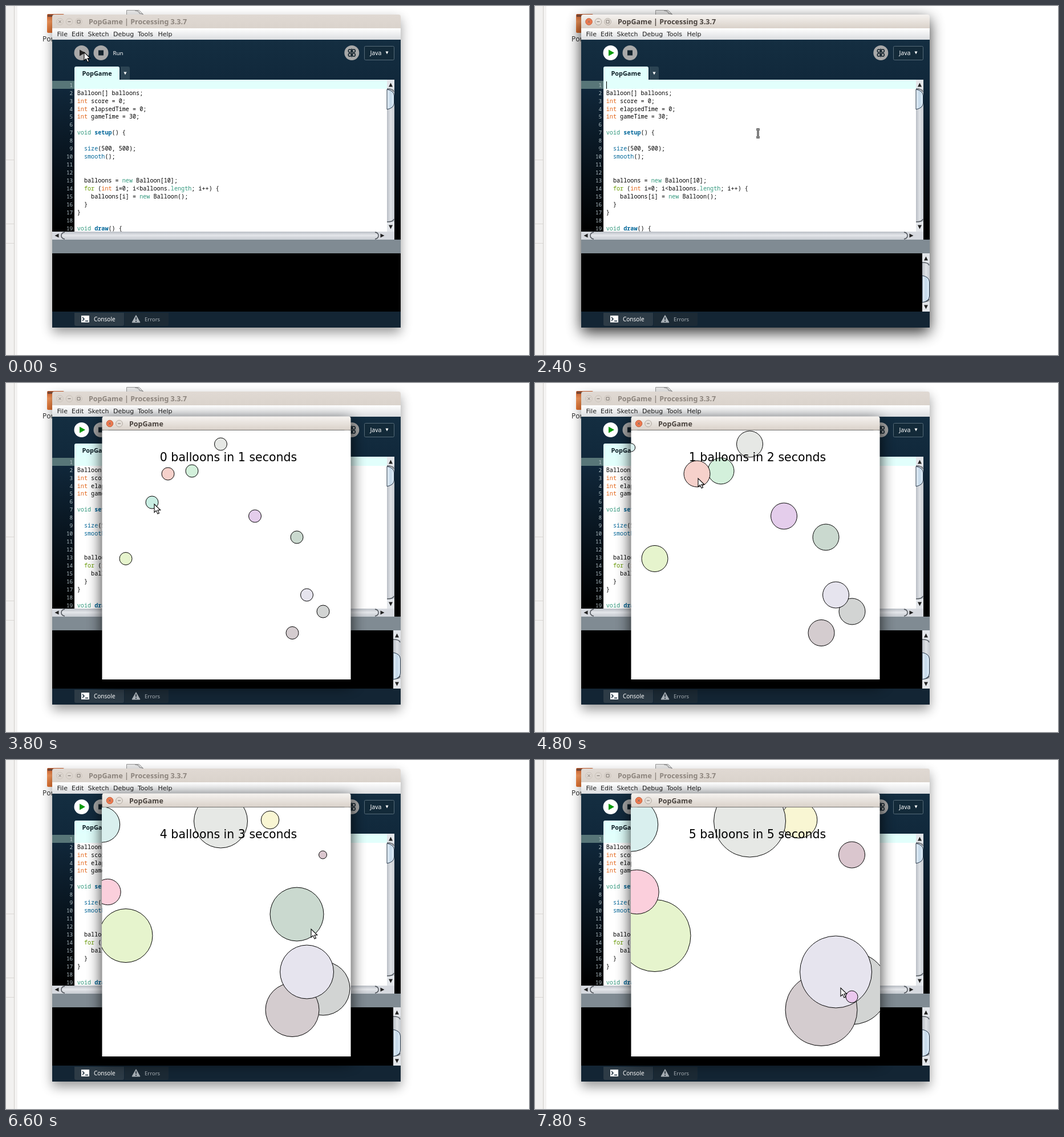
An HTML page for the animation above (8 s loop, 917 px wide and 611 px high).

```html
<!DOCTYPE html>
<html lang="en">
<head>
<meta charset="utf-8">
<title>PopGame</title>
<style>
html, body { margin: 0; width: 100%; height: 100%; overflow: hidden; background: #fff; }
svg { display: block; }
text { font-family: "Noto Sans", "Open Sans", sans-serif; white-space: pre; }
.menu text { font: 11px "DejaVu Sans", sans-serif; fill: #1c1c1c; }
.code text { font: 10.15px "Noto Sans Mono", monospace; fill: #000; }
.code .num { font-size: 9.2px; fill: #b4c3c8; text-anchor: end; }
.int { fill: #e2661a; }
.void, .new, .length { fill: #33997e; }
.for { fill: #669900; }
.size, .smooth { fill: #006699; }
.setup, .draw { fill: #006699; font-weight: bold; }
.title text { font-size: 12.5px; font-weight: bold; fill: #8d857e; }
.title .bar { fill: url(#dim); }
.title circle { fill: none; stroke: #cac2ba; }
.title path { fill: none; stroke: #77706a; }
.title.on text { fill: #4a433e; }
.title.on .bar { fill: url(#lit); }
.title.on circle { fill: #e6e0da; stroke: #b0a8a0; }
.title.on .close { fill: #ee7a50; stroke: #c0623f; }
.shade { filter: blur(10px); opacity: .4; }
.shade.on { filter: blur(13px); opacity: .8; }
#balls circle { stroke: #000; }
#count { font: 20.5px "DejaVu Sans", sans-serif; text-anchor: middle; }
</style>
</head>
<body>
<svg id="stage" width="917" height="611" viewBox="0 0 917 611"></svg>
<script>
const $ = id => document.getElementById(id);
const rect = (x, y, w, h, fill, more = '') =>
  `<rect x="${x}" y="${y}" width="${w}" height="${h}" fill="${fill}" ${more}/>`;
const path = (d, fill, more = '') => `<path d="${d}" fill="${fill}" ${more}/>`;
const disc = (x, y, r, fill, more = '') => `<circle cx="${x}" cy="${y}" r="${r}" fill="${fill}" ${more}/>`;
const text = (x, y, s, more = '') => `<text x="${x}" y="${y}" ${more}>${s}</text>`;
const grad = (id, stops, across) =>
  `<linearGradient id="${id}" x2="${across ? 1 : 0}" y2="${across ? 0 : 1}">` +
  stops.map(([o, c]) => `<stop offset="${o}" stop-color="${c}"/>`).join('') + '</linearGradient>';

// Small triangle pointing along (dx, dy)
const arrow = (x, y, dx, dy, s = 3.5, fill = '#222') =>
  path(`M${x + dx * s} ${y + dy * s}L${x - dx * s + dy * s} ${y - dy * s + dx * s}` +
       `L${x - dx * s - dy * s} ${y - dy * s - dx * s}Z`, fill);

function titleBar(id, x, y, w, buttons, label) {
  const marks = ['m-2-2l4 4m0-4l-4 4', 'm-2.5 0h5', 'm-2.5-2.5h5v5h-5z'];
  const cy = y + 12.5;
  let s = path(`M${x} ${y + 24}v-20q0-4 4-4h${w - 8}q4 0 4 4v20z`, '', 'class="bar" style="stroke:none"');
  buttons.forEach((bx, i) => {
    s += disc(bx, cy, 5.8, '', i ? '' : 'class="close"') + `<path d="M${bx} ${cy}${marks[i]}"/>`;
  });
  return `<g id="${id}" class="title on">${s}${text(buttons.at(-1) + 17.5, y + 17, label)}</g>`;
}

// Vertical scroll bar, thumb from a to b
function scrollBar(x, y, h, a, b) {
  const end = y + h, c = x + 6.5;
  return rect(x, y, 13, h, 'url(#track)') +
    rect(x, y, 13, 16, '#e3e6ea') + rect(x, end - 17, 13, 17, '#e3e6ea') +
    path(`M${x} ${y + 16}q11 0 12 5M${x} ${end - 17}q11 0 12-5`, 'none', 'stroke="#555b62" stroke-width="1.5"') +
    path(`M${x} ${a}q12 2 12.5 11v${b - a - 22}q-.5 9-12.5 11z`, 'url(#thumb)', 'stroke="#27384a"') +
    arrow(c, y + 9, 0, -1) + arrow(c, end - 8, 0, 1);
}

const source = `
Balloon[] balloons;
int score = 0;
int elapsedTime = 0;
int gameTime = 30;

void setup() {

  size(500, 500);
  smooth();


  balloons = new Balloon[10];
  for (int i=0; i&lt;balloons.length; i++) {
    balloons[i] = new Balloon();
  }
}

void draw() {`;
const words = /\b(int|void|new|length|for|size|smooth|setup|draw)\b/g;
const code = source.split('\n').map((line, i) => {
  const y = 141.6 + i * 13.97;
  return text(117, y, i + 1, 'class="num"') +
    text(124.8, y, line.replace(words, '<tspan class="$1">$1</tspan>'), 'xml:space="preserve"');
}).join('');

const desktop =
  rect(0, 0, 14, 611, '#f2f1f0') + rect(14, 0, 1, 611, '#cfccc9') + rect(15, 0, 5, 611, '#f4f3f2') +
  [269, 381, 415].map(y => rect(0, y, 14, 1, '#dad7d4')).join('') +
  rect(72, 14, 30, 33, 'url(#folder)', 'rx="2"') + rect(73, 15, 28, 4, '#7d4a35') +
  text(64, 62, 'Por', 'font-size="12" fill="#333"') +
  path('M211.500 30v-22.500h22l8 8v14.500z', '#e9e9e9', 'stroke="#999"') +
  path('M226 8q8 0 8 5 5 0 7 3', '#ccc', 'stroke="#888"');

const menu = [['File', 89.5], ['Edit', 115], ['Sketch', 143.5], ['Debug', 188], ['Tools', 231], ['Help', 266.5]]
  .map(([s, x]) => text(x, 52.5, s)).join('');

const toolbar =
  disc(132.5, 82, 13, '#a9a9a9', 'id="play"') + path('M129 76.500v11l10-5.500z', '#222', 'id="tri"') +
  disc(166.5, 82, 13, '#a9a9a9') + rect(162, 77.5, 9, 9, '#15242e') +
  text(187.5, 86, 'Run', 'id="run" font-size="9.7" fill="#fff"') +
  disc(606.3, 82, 13, '#a9a9a9') +
  `<g fill="none" stroke="#15242e" stroke-width="1.5">` +
  [[602.8, 78.5], [609.8, 78.5], [602.8, 85.5], [609.8, 85.5]].map(([x, y]) => disc(x, y, 2.6, 'none')).join('') +
  '<path d="M606.300 74.500v15"/></g>' +
  rect(628.5, 70.5, 52, 24, '#132a39', 'rx="2" stroke="#566b78"') +
  text(638.5, 85.5, 'Java', 'font-size="10.5" fill="#fff"') + arrow(668, 82, 0, 1, 2.5, '#fff') +
  path('M120 129v-20q0-3 3-3h73q3 0 3 3v20z', '#e0fffd') +
  text(133.5, 121.5, 'PopGame', 'font-size="10.9" font-weight="600" fill="#0a1a22"') +
  path('M201 129v-23h13q3 0 3 3v20z', '#2c4453') + arrow(209, 118, 0, 1, 2.6, '#fff');

const editor =
  rect(120, 129, 548, 266, '#fff') + rect(120, 129, 548, 16, '#e2fffc') + rect(81, 131, 39, 14, '#587678') +
  `<clipPath id="page"><path d="M81 129h587v266h-587z"/></clipPath><g class="code" clip-path="url(#page)">${code}</g>` +
  rect(125, 132, 1, 13, '#000', 'id="caret"') +
  scrollBar(668, 129, 266, 146, 181) +
  rect(81, 395, 600, 14, '#d6d9df') + rect(97, 395, 557, 13, 'url(#rail)', 'rx="6"') +
  path('M103 396q-6 1-6 6t6 6M647 396q6 1 6 6t-6 6', 'none', 'stroke="#50555b" stroke-width="1.5"') +
  arrow(89, 402, -1, 0) + arrow(660, 402, 1, 0);

const footer =
  rect(81, 409, 611, 24, '#808b93') + rect(81, 433, 611, 102, '#000') +
  `<g id="bar">${scrollBar(679, 433, 102, 472, 519)}</g>` + rect(81, 535, 611, 28, '#132534') +
  path('M120 537h87v20q0 3-3 3h-81q-3 0-3-3z', '#2d3b46') + path('M208 537h77v20q0 3-3 3h-74z', '#1c2a35') +
  rect(132, 542, 14, 12, '#fff') + path('M134 545l3 3-3 3M139 551.500h5', 'none', 'stroke="#132534" stroke-width="1.5"') +
  text(154, 552, 'Console', 'font-size="10" fill="#fff"') +
  path('M228 541.500l7 12.500h-14z', '#a9b1b7', 'stroke="#a9b1b7" stroke-linejoin="round"') +
  path('M228 545v4.500m0 1.500v2', 'none', 'stroke="#1c2a35" stroke-width="1.6"') +
  text(243, 552, 'Errors', 'font-size="9.5" fill="#a9b1b7"');

const beam = 'M-3-7h2.500l.5 1 .5-1h2.500M0-6v12M-3 7h2.500l.5-1 .5 1h2.500';

$('stage').innerHTML = '<defs>' +
  grad('lit', [[0, '#f6f3f0'], [1, '#d9d1c9']]) + grad('dim', [[0, '#e0d9d3'], [1, '#dad3cc']]) +
  grad('menu', [[0, '#fff'], [1, '#dcdee1']]) + grad('deep', [[0, '#142e41'], [.25, '#10273a'], [.95, '#000']]) +
  grad('track', [[0, '#b9bec5'], [.5, '#dfe2e6'], [1, '#c8ccd2']], 1) +
  grad('rail', [[0, '#b9bec5'], [.5, '#e4e6ea'], [1, '#c8ccd2']]) +
  grad('thumb', [[0, '#e8f1f8'], [.5, '#c3d7e8'], [1, '#e3f1fb']], 1) +
  grad('folder', [[0, '#c65a2a'], [.4, '#f0955a'], [1, '#e0702f']]) +
  '<clipPath id="field"><path d="M168 83h437v436h-437z"/></clipPath></defs>' +
  desktop + rect(81, 23, 611, 549, '#000', 'id="ideShade" class="shade" rx="4"') +
  rect(81, 59, 611, 350, 'url(#deep)') + rect(81, 39, 611, 20, 'url(#menu)') +
  titleBar('ideTitle', 81, 15, 611, [94.5, 111, 127.5], 'PopGame | Processing 3.3.7') +
  `<g class="menu">${menu}</g>` + toolbar + editor + footer +
  '<g id="game">' + rect(168, 66, 437, 462, '#000', 'class="shade on" rx="4"') +
  rect(168.5, 83, 436, 436, '#fff') + titleBar('gameTitle', 168.5, 58.5, 436, [182, 198.5], 'PopGame') +
  '<g id="balls" clip-path="url(#field)"></g>' + text(390, 137, '', 'id="count"') + '</g>' +
  path('M0 0v14.500l3.400-3.100 2.500 5.700 2.600-1.200-2.500-5.400h4.700z', '#fff', 'id="hand" stroke="#000" stroke-width="1.1"') +
  `<g id="beam">${path(beam, 'none', 'stroke="#000" stroke-width="3"')}${path(beam, 'none', 'stroke="#fff"')}</g>`;

// Balloons in drawing order: first one, then its successor with the size at which it starts
const slots = [
  [210, 307.5, '#e6f4cd'],
  [326, 154, '#d3f0db', 463, 105, '#f9f6d3', 31.2],
  [284, 159, '#f6d1cb', 178.5, 231, '#fbcfdc', 24.3],
  [376.5, 107, '#e6e8e5'],
  [256, 209, '#c9eee3', 168.5, 113, '#d9efee', 15.8],
  [436.5, 233, '#e4cdeb', 555.5, 166, '#dac6ce', 40],
  [556, 400, '#d2d4d3'],
  [502, 437.5, '#d4cccf'],
  [527.5, 371, '#e6e4ee'],
  [510, 270, '#cad9cf', 555.5, 414.5, '#ebc8ee', 52.5]
];
const sizes = [[2975, 0], [3800, 11], [4200, 16.3], [4600, 20.3], [5700, 35], [6700, 48.3],
  [7000, 52], [7200, 54.5], [7500, 59.5], [7800, 63]];
const moves = [[1600, 137, 81], [1800, 420, 92], [2000, 668, 150], [2200, 540, 230], [2400, 391, 223],
  [3000, 391, 223], [3600, 275, 215], [3800, 260, 212], [4500, 260, 212], [4800, 286, 167],
  [5000, 288, 165], [5300, 325, 158], [5700, 443, 234], [6100, 443, 236], [6600, 535, 296],
  [7050, 534, 292], [7800, 536, 399]];
const spans = [[0, 0], [1300, 1300], [1700, 2400], [3100, 3600], [3800, 4200], [4600, 5000], [5200, 5700],
  [6200, 6700], [7000, 7000], [7200, 7200], [7400, 7500], [7800, 7800]];

function hold(t) {
  const [, end] = spans.findLast(s => s[0] <= t);
  return Math.min(Math.floor(t / 100) * 100, end);
}

function at(keys, t) {
  const i = keys.findIndex(k => k[0] > t);
  if (i < 0) return keys.at(-1).slice(1);
  if (!i) return keys[0].slice(1);
  const a = keys[i - 1], b = keys[i], p = (t - a[0]) / (b[0] - a[0]);
  return a.slice(1).map((v, j) => v + (b[j + 1] - v) * p);
}

const show = (id, on) => $(id).setAttribute('visibility', on ? 'visible' : 'hidden');

function draw(t) {
  const started = t >= 1300, playing = t >= 3100, focus = started && !playing;
  $('ideShade').classList.toggle('on', focus);
  $('ideTitle').classList.toggle('on', focus);
  $('play').setAttribute('fill', started ? '#fff' : '#a9a9a9');
  $('tri').setAttribute('fill', started ? '#0a9a0a' : '#222');
  show('run', t < 1700);
  show('bar', started);
  show('caret', focus && t >= 2000);

  $('game').setAttribute('opacity', playing ? Math.min(1, (t - 3000) / 200) : 0);
  const [size] = at(sizes, t);
  let score = 0;
  $('balls').innerHTML = slots.map(s => {
    const popped = size - s[6] > 2;
    score += popped;
    return popped ? disc(s[3], s[4], size - s[6], s[5]) : disc(s[0], s[1], size, s[2]);
  }).join('');
  $('count').textContent = `${score} balloons in ${Math.max(0, Math.floor((t - 2700) / 1000))} seconds`;

  const [x, y] = at(moves, t);
  const typing = !playing && x > 120 && x < 668 && y > 129;
  for (const id of ['hand', 'beam']) {
    show(id, typing === (id === 'beam'));
    $(id).setAttribute('transform', `translate(${x} ${y})`);
  }
}

function tick() {
  draw(hold(performance.now() % 8000));
  requestAnimationFrame(tick);
}
tick();
</script>
</body>
</html>
```
